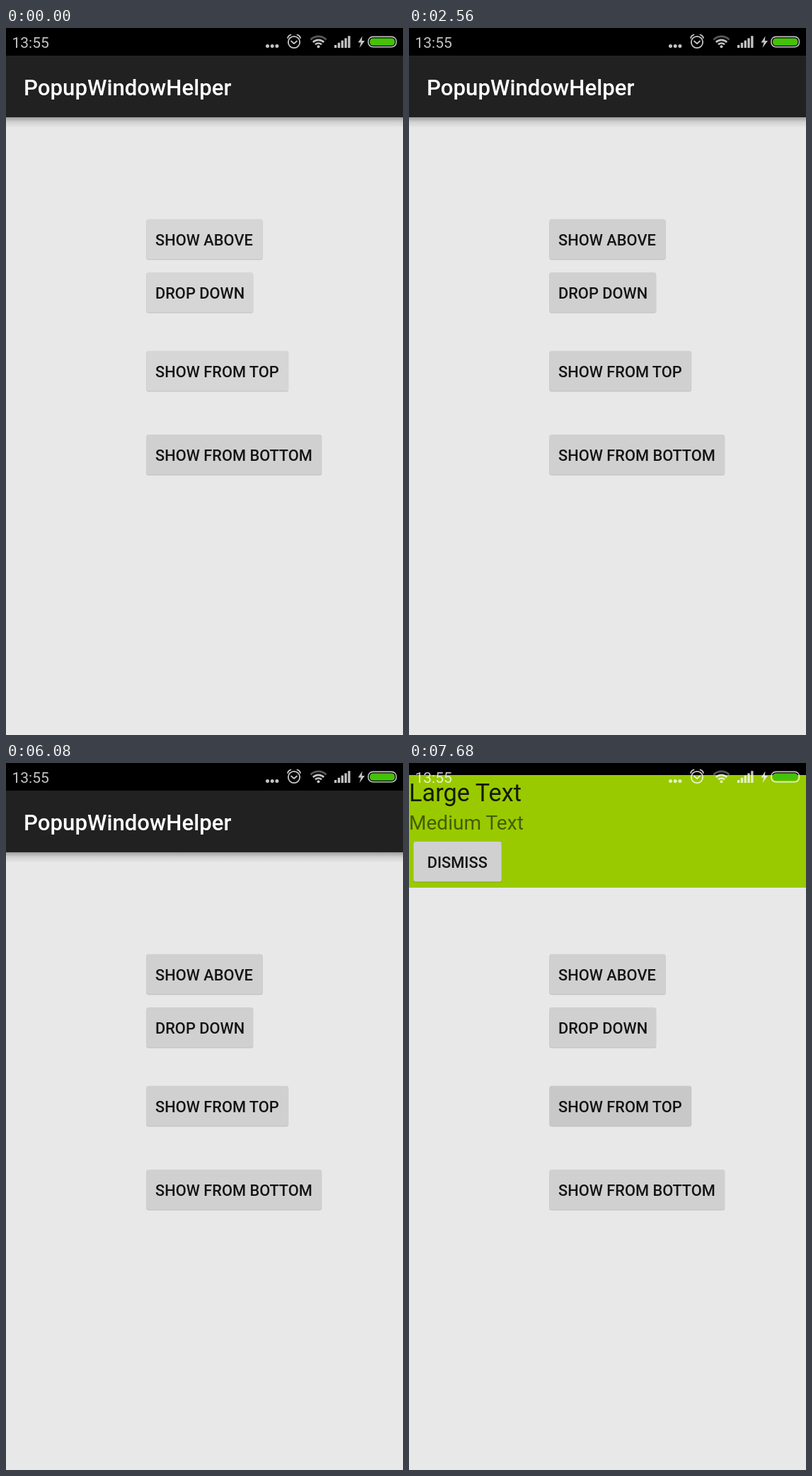
These frames come from a looping animation (561 px wide and 998 px high, 8 s). An HTML page:

```html
<!DOCTYPE html>
<html lang="en">
<head>
<meta charset="utf-8">
<title>Popup window demo</title>
<style>
  html, body { margin: 0; width: 100%; height: 100%; overflow: hidden; background: #e8e8e8; }
  svg { display: block; width: 561px; height: 998px; font-family: Roboto, sans-serif; }
  .label { font-size: 21.8px; font-weight: 500; fill: #141414; }
  .face { fill: #d0d0d0; }
  .line { fill: none; stroke: #fff; stroke-width: 1.8; stroke-linecap: round; stroke-linejoin: round; }
</style>
</head>
<body>
<svg viewBox="0 0 561 998">
  <defs>
    <linearGradient id="shade" x2="0" y2="1">
      <stop offset="0" stop-opacity=".32"/>
      <stop offset=".45" stop-opacity=".1"/>
      <stop offset="1" stop-opacity="0"/>
    </linearGradient>
  </defs>
  <rect width="561" height="998" fill="#e8e8e8"/>
  <rect y="126" width="561" height="15" fill="url(#shade)"/>
  <rect width="561" height="126" fill="#212121"/>
  <rect width="561" height="39"/>
  <text x="25" y="95" font-size="31.2" font-weight="500" fill="#fff">PopupWindowHelper</text>

  <g id="buttons"></g>

  <g id="popup">
    <rect id="panel" width="162.5" height="159" fill="#99ca00"/>
    <text y="37" font-size="34.3" fill-opacity=".87">Large Text</text>
    <text y="77" font-size="28.05" fill-opacity=".54">Medium Text</text>
    <g id="dismiss"></g>
  </g>

  <g id="status" fill="#fff" opacity=".77">
    <text x="8.5" y="27.5" font-size="21">13:55</text>
    <circle cx="369.5" cy="25.5" r="2.5"/>
    <circle cx="376.2" cy="25.5" r="2.5"/>
    <circle cx="382.9" cy="25.5" r="2.5"/>
    <g class="line">
      <circle cx="407" cy="20" r="8.2"/>
      <path d="M403 18.5l4 3.5 4-3.5M398 14q1-3.5 4.5-4.5M416 14q-1-3.5-4.5-4.5"/>
    </g>
    <g class="line" stroke-width="2.6" style="stroke-width:2.6;stroke-linecap:butt">
      <path d="M430.5 16.5a15.5 15.5 0 0 1 22 0" opacity=".45"/>
      <path d="M433.8 20a11 11 0 0 1 15.4 0M437 23.3a6.5 6.5 0 0 1 9 0"/>
    </g>
    <circle cx="441.5" cy="26.2" r="2"/>
    <g id="signal"></g>
    <path d="M503.5 11.5l-6 9h4l-2 7.5 7.5-10h-4.2z"/>
    <rect class="line" x="511.9" y="12.4" width="39.6" height="14.4" rx="6.5" style="stroke-width:1.6"/>
  </g>
  <rect x="514" y="14.5" width="35.4" height="10.2" rx="4.5" fill="#45c108"/>
</svg>
<script>
const LOOP = 8000, STEP = 320;
const IDLE = '#d0d0d0', PRESSED = '#c8c8c8', FADED = '#d6d6d6';
const $ = id => document.getElementById(id);

const button = (name, x, y, width, label, inset, ripple = '') => `
  <clipPath id="${name}Clip"><rect x="${x}" y="${y}" width="${width}" height="56.5" rx="3"/></clipPath>
  <rect x="${x - .5}" y="${y + .3}" width="${width + 1}" height="57.4" rx="3.5" fill-opacity=".08"/>
  <rect x="${x}" y="${y + 1}" width="${width}" height="56.5" rx="3" fill-opacity=".1"/>
  <rect id="${name}" class="face" x="${x}" y="${y}" width="${width}" height="56.5" rx="3"/>
  <g clip-path="url(#${name}Clip)">${ripple}</g>
  <text class="label" x="${x + inset}" y="${y + 36.8}">${label}</text>`;

const ripple = (name, x, y, r) =>
  `<circle id="${name}Ripple" cx="${x}" cy="${y}" r="${r}" fill="${PRESSED}"/>`;

$('buttons').innerHTML =
  button('above', 198.5, 269.7, 164, 'SHOW ABOVE', 12.5) +
  button('drop', 198.5, 344.9, 150.6, 'DROP DOWN', 12.5, ripple('drop', 273, 374, 68)) +
  button('top', 198.5, 455.8, 200.4, 'SHOW FROM TOP', 12.5, ripple('top', 311, 490, 100)) +
  button('bottom', 198.5, 573.9, 247.5, 'SHOW FROM BOTTOM', 12.5);
$('dismiss').innerHTML = button('close', 6.3, 93.9, 124.5, 'DISMISS', 19.4);

$('signal').innerHTML = [0, 1, 2, 3, 4].map(i =>
  `<rect x="${464 + i * 4.8}" y="${24 - i * 3.2}" width="3.3" height="${4 + i * 3.2}"/>`).join('');

const within = (t, from, to) => t >= from && t < to;
const paint = (name, pressed, rest = IDLE) => { $(name).style.fill = pressed ? PRESSED : rest; };
const show = (id, visible) => $(id).setAttribute('visibility', visible ? 'visible' : 'hidden');

function placePopup(x, y, width, opacity) {
  $('popup').setAttribute('transform', `translate(${x} ${y})`);
  $('popup').setAttribute('opacity', opacity);
  $('panel').setAttribute('width', width);
}

function draw(time) {
  // The screen refreshes in coarse steps.
  const t = Math.floor(time / STEP) * STEP;
  const rest = t < STEP ? FADED : IDLE;

  paint('above', within(t, 960, 1600), rest);
  paint('drop', within(t, 3840, 4800), rest);
  paint('top', t >= 7360, rest);
  paint('close', within(t, 2240, 2560) || within(t, 5120, 6080));
  show('dropRipple', t === 3520);
  show('topRipple', t === 7040);

  if (within(t, 960, 2560)) {
    placePopup(192.3, 101, 162.2, t < 2240 ? 1 : .5);
  } else if (within(t, 3840, 6080)) {
    placePopup(192.3, 410, 162.2, t < 5760 ? 1 : .5);
  } else if (t >= 7040) {
    const progress = (t - 6883) / 1049;
    const eased = (1 - Math.cos(Math.PI * progress)) / 2;
    placePopup(0, Math.round(-120 + 159 * eased), 561, Math.min(1, progress / .46));
  } else {
    placePopup(0, 0, 0, 0);
  }
}

const start = performance.now();
function tick() {
  draw((performance.now() - start) % LOOP);
  requestAnimationFrame(tick);
}
tick();
</script>
</body>
</html>
```
